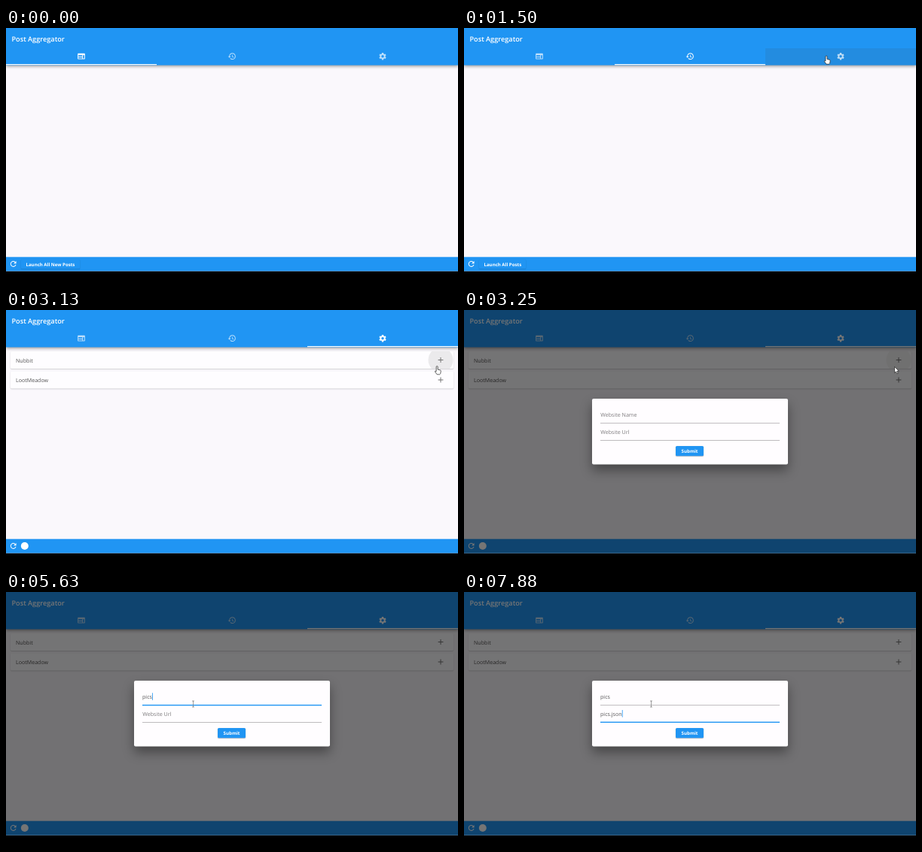
An HTML page with a canvas that plays this animation: 600x338 px, repeating every 8000 ms.

```html
<!DOCTYPE html>
<html lang="en">
<head>
<meta charset="utf-8">
<title>Post Aggregator</title>
<style>
  html, body { margin: 0; width: 100%; height: 100%; overflow: hidden; background: #000; }
  canvas { display: block; width: 600px; height: 338px; }
</style>
</head>
<body>
<canvas id="stage" width="600" height="338"></canvas>
<script>
const ctx = document.getElementById('stage').getContext('2d');
const BLUE = '#2095f3', LOOP = 8000, STEP = 125, APP_HEIGHT = 323.5;

// Icons on a 24 unit grid
const icons = {
  web: new Path2D('M20 4H4c-1.1 0-2 .9-2 2v12c0 1.1.9 2 2 2h16c1.1 0 2-.9 2-2V6c0-1.1-.9-2-2-2zM4 9h10.5v3.5H4V9zm0 5.5h10.5V18H4v-3.5zM20 18h-3.5V9H20v9z'),
  history: new Path2D('M13 3c-4.97 0-9 4.03-9 9H1l3.9 3.9.1.1L9 12H6c0-3.87 3.13-7 7-7s7 3.13 7 7-3.13 7-7 7c-1.93 0-3.68-.79-4.94-2.06l-1.42 1.42C8.27 20 10.5 21 13 21c4.97 0 9-4.03 9-9s-4.03-9-9-9zm-1 5v5l4.28 2.54.72-1.21-3.5-2.08V8H12z'),
  gear: gearPath(),
  refresh: new Path2D('M17.65 6.35C16.2 4.9 14.2 4 12 4c-4.42 0-8 3.58-8 8s3.58 8 8 8c3.73 0 6.84-2.55 7.73-6h-2.08c-.82 2.33-3.04 4-5.65 4-3.3 0-6-2.7-6-6s2.7-6 6-6c1.66 0 3.14.69 4.22 1.78L13 11h7V4l-2.35 2.35z'),
  plus: new Path2D('M19 13h-6v6h-2v-6H5v-2h6V5h2v6h6z')
};
const cursors = {
  arrow: new Path2D('M0 0v8.2l1.9-1.8 1.4 3 1.4-.6-1.4-3h2.6z'),
  hand: new Path2D('M-1 .5q0-1 1-1t1 1v3.5l3.2.8q1 .3.9 1.4l-.5 3q-.3 1-1 1.4h-3.6l-2.8-3.9q0-1.2 1.8-.2z'),
  beam: new Path2D('M-1.5-4h3M0-4v8M-1.5 4h3')
};

// Time, x, y, cursor kind
const track = [
  [125, 58, 311, 'arrow'], [375, 150, 185, 'arrow'], [625, 255, 60, 'arrow'], [750, 279, 44, 'hand'],
  [875, 284, 40, 'hand'], [1125, 286, 40, 'hand'], [1375, 440, 37, 'hand'], [1500, 481, 37.5, 'hand'],
  [2000, 483, 38, 'hand'], [2250, 520, 52, 'arrow'], [2500, 570, 72, 'hand'], [2625, 573, 77, 'hand'],
  [2875, 573.5, 74.5, 'hand'], [3250, 571.5, 75.5, 'arrow'], [3375, 568, 77, 'arrow'],
  [3625, 430, 115, 'arrow'], [3750, 330, 142, 'beam'], [3875, 270, 149, 'beam'],
  [4000, 254, 147, 'beam'], [4250, 252, 146, 'beam'], [4500, 249, 151, 'beam'], [4625, 248.5, 149, 'beam']
];
const nameKeys = [[5125, 'p'], [5250, 'pi'], [5375, 'pic'], [5500, 'pics']];
const urlKeys = [[6500, 'p'], [6750, 'pics'], [6875, 'pics.js'], [7250, 'pics.jso'], [7375, 'pics.json']];

function gearPath() {
  const path = new Path2D();
  for (let tooth = 0; tooth < 6; tooth++) {
    for (const [r, a] of [[7.4, -.36], [10, -.22], [10, .22], [7.4, .36]]) {
      const angle = Math.PI * (tooth / 3 + .5) + a;
      path.lineTo(12 + r * Math.cos(angle), 12 + r * Math.sin(angle));
    }
  }
  path.closePath();
  path.moveTo(15.6, 12);
  path.arc(12, 12, 3.6, 0, 7);
  return path;
}

const ease = (t, start) => {
  const p = Math.min(1, Math.max(0, (t - start) / 300));
  return p * p * (3 - 2 * p);
};
const typed = (keys, t) => keys.reduce((text, [at, value]) => t >= at ? value : text, '');

function rect(x, y, w, h, color) {
  ctx.fillStyle = color;
  ctx.fillRect(x, y, w, h);
}
function box(x, y, w, h, color, blur, drop, shade, radius = 1.5) {
  ctx.save();
  ctx.shadowColor = `rgba(0,0,0,${shade})`;
  ctx.shadowBlur = blur;
  ctx.shadowOffsetY = drop;
  ctx.fillStyle = color;
  ctx.beginPath();
  ctx.roundRect(x, y, w, h, radius);
  ctx.fill();
  ctx.restore();
}
function disc(x, y, r, color) {
  ctx.fillStyle = color;
  ctx.beginPath();
  ctx.arc(x, y, r, 0, 7);
  ctx.fill();
}
function label(text, x, y, size, color, weight = 400) {
  ctx.font = `${weight} ${size}px "Open Sans", "Noto Sans", sans-serif`;
  ctx.fillStyle = color;
  ctx.fillText(text, x, y);
  return ctx.measureText(text).width;
}
function icon(name, x, y, color) {
  ctx.save();
  ctx.translate(x, y);
  ctx.scale(.485, .485);
  ctx.translate(-12, -12);
  ctx.fillStyle = color;
  ctx.fill(icons[name], 'evenodd');
  ctx.restore();
}

function drawSources(t, shift) {
  ctx.save();
  ctx.translate(shift, 0);
  ['Nubbit', 'LootMeadow'].forEach((name, i) => {
    const y = 55 + i * 26.5;
    box(6, y, 588, 23, '#fefdff', 1.5, .8, .2);
    if (i === 0 && t >= 2500 && t < 3500) {
      ctx.save();
      ctx.beginPath();
      ctx.rect(6, y, 588, 23);
      ctx.clip();
      disc(577, 66.5, 16.5, t < 3250 ? '#ebeaec' : '#f5f4f6');
      ctx.restore();
    }
    label(name, 13, y + 14.8, 7.1, '#555');
    icon('plus', 577, y + 11.5, '#737373');
  });
  ctx.restore();
}

function drawApp(t) {
  const tab = t < 1000 ? 0 : t < 1625 ? 1 : 2;
  const slide = ease(t, 1000) + ease(t, 1625);
  rect(0, 0, 600, APP_HEIGHT, '#faf8fc');
  if (slide > 1) drawSources(t, (2 - slide) * 600);

  box(0, -5, 600, 54.5, BLUE, 4, 1.5, .4, 0);
  label('Post Aggregator', 7.5, 17.5, 9.15, '#fff', 600);
  const hover = t >= 625 && t < 1250 ? 1 : t >= 1375 && t < 2125 ? 2 : 0;
  if (hover) rect(hover * 200, 27, 200, 22.5, 'rgba(60,60,60,.1)');
  ['web', 'history', 'gear'].forEach((name, i) => {
    const active = Math.max(0, 1 - Math.abs(slide - i));
    icon(name, 100 + i * 200, 37.7, `rgba(255,255,255,${.7 + .3 * active})`);
  });
  rect(slide * 200, 48, 200, 1.2, '#fff');

  rect(0, 304.7, 600, APP_HEIGHT - 304.7, BLUE);
  icon('refresh', 9.7, 314, '#fff');
  if (tab === 2) {
    disc(24.8, 314, 5, '#fff');
  } else {
    box(20, 308, tab ? 62 : 78, 12.5, BLUE, 1.5, .6, .22);
    label(tab ? 'Launch All Posts' : 'Launch All New Posts', 26.5, 316.9, 6.1, '#fff', 700);
  }
}

function drawField(hint, text, y, focused, caret) {
  const width = text ? label(text, 181, y, 7.1, '#555') : 0;
  if (!text) label(hint, 181.3, y, 7.1, '#7d7b7d');
  if (focused) rect(181, y + 7.6, 238, 1.4, BLUE);
  else rect(181, y + 8, 238, .8, '#aeacae');
  if (focused && caret) rect(181.2 + width, y - 8, .8, 9.6, BLUE);
}

function drawDialog(t) {
  rect(0, 0, 600, APP_HEIGHT, 'rgba(0,0,0,.54)');
  box(170, 118, 260, 87.5, '#fffdff', 15, 8, .38, 2);
  const first = t >= 4750 && t < 5875, second = t >= 5875;
  const blink = since => t - since < 250 || Math.floor((t - since) / 500) % 2 === 0;
  drawField('Website Name', typed(nameKeys, t), 142.3, first, t >= 4875 && (t < 5125 || blink(5500)));
  drawField('Website Url', typed(urlKeys, t), 165, second, t > 6500 || blink(5875));
  box(281, 181, 37, 13.2, BLUE, 1.5, .8, .28);
  label('Submit', 288.6, 190.1, 6.15, '#fff', 700);
}

function drawCursor(t) {
  if (t < track[0][0]) return;
  let i = track.length - 1;
  while (track[i][0] > t) i--;
  const [at, x, y, kind] = track[i];
  const [nextAt, nextX, nextY] = track[i + 1] || [at + 1, x, y];
  const p = Math.min(1, (t - at) / (nextAt - at));
  ctx.save();
  ctx.translate(x + (nextX - x) * p, y + (nextY - y) * p);
  ctx.lineWidth = .7;
  ctx.strokeStyle = kind === 'beam' ? '#777' : '#222';
  ctx.fillStyle = '#fff';
  if (kind !== 'beam') ctx.fill(cursors[kind]);
  ctx.stroke(cursors[kind]);
  ctx.restore();
}

function render(now) {
  const t = Math.floor(Math.floor((now % LOOP) / 10) / 12.5) * STEP;
  ctx.textRendering = 'geometricPrecision';
  rect(0, 0, 600, 338, '#000');
  drawApp(t);
  if (t >= 3250) drawDialog(t);
  drawCursor(t);
}

const start = performance.now();
function tick() {
  render(performance.now() - start);
  requestAnimationFrame(tick);
}
tick();
</script>
</body>
</html>
```
